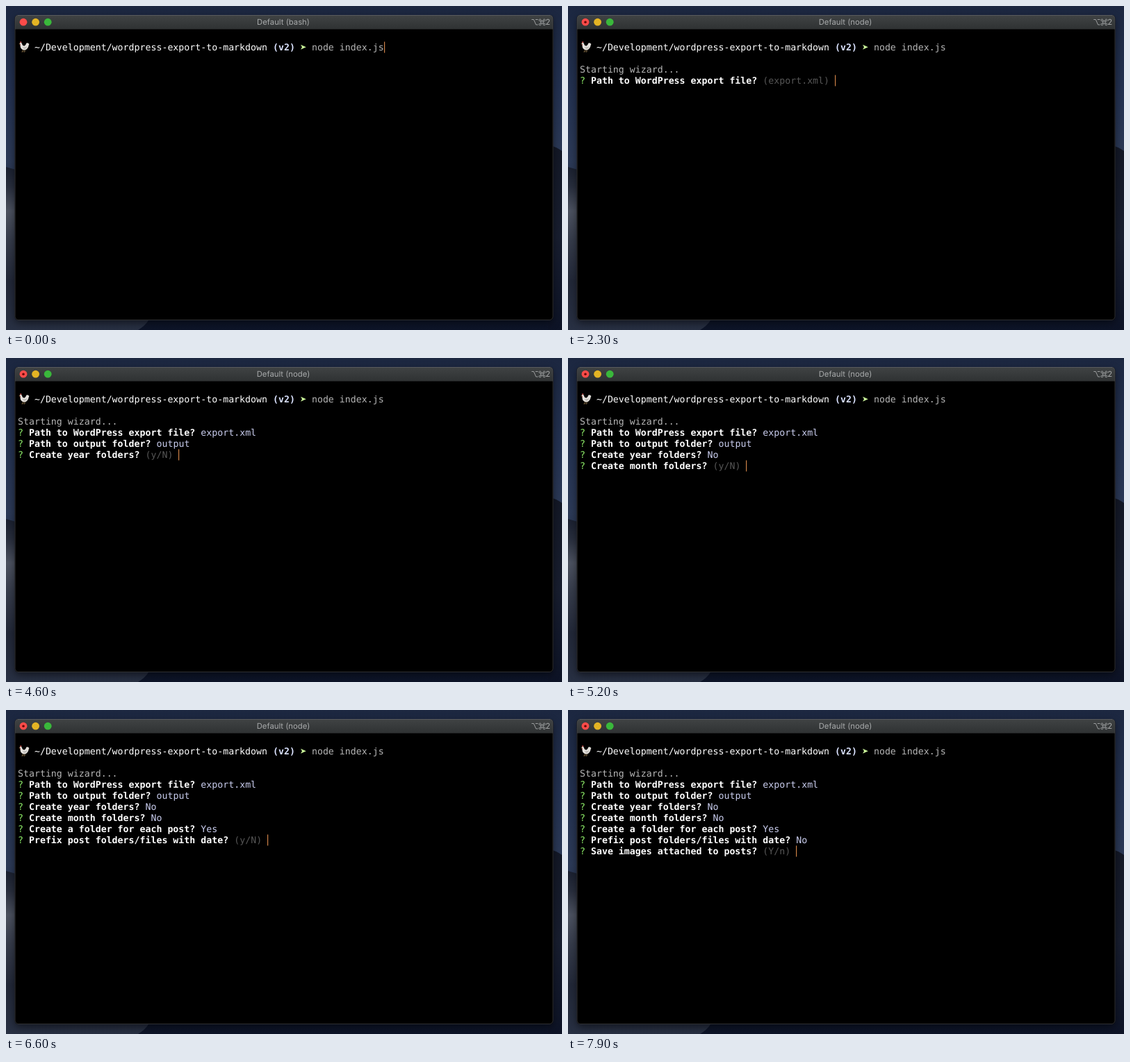
An HTML page that plays this animation: 800 by 467 pixels, repeating every 8 s.

```html
<!DOCTYPE html>
<html lang="en">
<head>
<meta charset="utf-8">
<title>Terminal wizard</title>
<style>
  html, body { margin: 0; width: 100%; height: 100%; overflow: hidden; background: #0b1022; }
  svg { display: block; width: 800px; height: 467px; }
  .mono { font: 13.255px "DejaVu Sans Mono", monospace; white-space: pre; fill: #b6b6b6; text-rendering: geometricPrecision; }
  .mono .path { fill: #fff; }
  .mono .branch { fill: #dbe3ff; font-weight: bold; }
  .mono .mark { fill: #8ff06a; }
  .mono .ask { fill: #fff; font-weight: bold; }
  .mono .hint { fill: #565656; }
  .mono .answer { fill: #c9cdee; }
  .title { font: 11.3px Inter, Roboto, sans-serif; fill: #a8aaab; text-rendering: geometricPrecision; }
</style>
</head>
<body>
<svg viewBox="0 0 800 467">
  <defs>
    <linearGradient id="sky" x2="0" y2="1">
      <stop offset="0" stop-color="#1c2740"/>
      <stop offset=".25" stop-color="#233150"/>
      <stop offset=".48" stop-color="#2c3a57"/>
      <stop offset=".7" stop-color="#172138"/>
      <stop offset="1" stop-color="#0d1428"/>
    </linearGradient>
    <linearGradient id="leftDune" x2="0" y2="1">
      <stop offset="0" stop-color="#1a2030"/>
      <stop offset=".12" stop-color="#282e3d"/>
      <stop offset=".27" stop-color="#4c5260"/>
      <stop offset=".45" stop-color="#363c4b"/>
      <stop offset=".7" stop-color="#222838"/>
      <stop offset="1" stop-color="#283043"/>
    </linearGradient>
    <linearGradient id="rightDune" x2="0" y2="1">
      <stop offset="0" stop-color="#131826"/>
      <stop offset=".5" stop-color="#181e2f"/>
      <stop offset="1" stop-color="#0d1326"/>
    </linearGradient>
    <linearGradient id="bar" x2="0" y2="1">
      <stop offset="0" stop-color="#404344"/>
      <stop offset="1" stop-color="#2f3233"/>
    </linearGradient>
    <filter id="blur" x="-10%" y="-10%" width="120%" height="120%">
      <feGaussianBlur stdDeviation="6"/>
    </filter>
  </defs>

  <rect width="800" height="467" fill="url(#sky)"/>
  <path d="M0 232L14 236L100 400L205 453Q200 461 190 467H0Z" fill="url(#leftDune)"/>
  <path d="M780 200Q792 203 800 209V467H780Z" fill="url(#rightDune)"/>
  <rect x="13" y="17" width="774" height="440" rx="6" fill="#000" opacity=".5" filter="url(#blur)"/>

  <rect x="12.5" y="13" width="775" height="440" rx="5" fill="#000"/>
  <path d="M13 33.5V18Q13 13 18 13H782Q787 13 787 18V33.5Z" fill="url(#bar)"/>
  <path d="M17 13.5H783" stroke="#66696b"/>
  <rect x="13" y="13.5" width="774" height="439" rx="5" fill="none" stroke="#505355" stroke-opacity=".6"/>
  <circle cx="25" cy="23.2" r="5.4" fill="#fc4b49"/>
  <circle id="busy" cx="25" cy="23.2" r="1.8" fill="#680a08"/>
  <circle cx="42.6" cy="23.2" r="5.4" fill="#e4b424"/>
  <circle cx="60.2" cy="23.2" r="5.4" fill="#3ab83b"/>
  <text id="title" class="title" x="399" y="27.3" text-anchor="middle"></text>
  <g fill="none" stroke="#a8aaab" stroke-width=".9">
    <path d="M756.3 19.5H759.3L762.6 27H765.5M761.8 19.5H765.5"/>
    <path d="M769.7 21.7H773.1V25.1H769.7Z"/>
    <circle cx="768.4" cy="20.4" r="1.4"/>
    <circle cx="774.4" cy="20.4" r="1.4"/>
    <circle cx="768.4" cy="26.4" r="1.4"/>
    <circle cx="774.4" cy="26.4" r="1.4"/>
  </g>
  <text class="title" x="776.3" y="27.3">2</text>

  <!-- rooster -->
  <path d="M24.5 63L24.2 66H22.5M27 63V66H25.5" fill="none" stroke="#a98a58" stroke-width=".8"/>
  <path d="M20 53.2Q22 51.8 23 54.2Q23.8 57.6 26.5 57.4Q28.6 56.4 29.4 53.6Q31.8 52.4 33.4 55Q32.6 56 32.4 58Q31 62.4 27.4 63.4Q22.8 63.8 21 60Q20.4 57 20 53.2Z" fill="#e4e1dc"/>
  <path d="M24 59.3Q27 60.2 30.6 58Q29.4 61.6 26.5 61.8Q24.5 61.2 24 59.3Z" fill="#bab7b3"/>
  <path d="M19.8 53L20 51.4L21 51.6L21.8 51L22.8 52.8ZM19.8 55.3L21 55L20.8 57.2Q19.7 57 19.8 55.3Z" fill="#b8504a"/>
  <path d="M20.1 53.8L18.4 54.7L20.1 55.1Z" fill="#c2a06a"/>

  <g class="mono" id="screen">
    <path d="M424 55.8L431.8 59.3L424 62.8L426 59.3Z" fill="#cbf59a"/>
  </g>
  <rect id="cursor" width="1.2" height="16" fill="#cc8046"/>
</svg>

<script>
  const LOOP = 8000, ENTER = 1000, READY = 1800;
  const LEFT = 17, CELL = 7.98, BASE = 64, LINE = 16;

  // question, hint, answer, time of the answer
  const steps = [
    ["Path to WordPress export file?", "(export.xml)", "export.xml", 3300],
    ["Path to output folder?", "(output)", "output", 4100],
    ["Create year folders?", "(y/N)", "No", 4900],
    ["Create month folders?", "(y/N)", "No", 5700],
    ["Create a folder for each post?", "(Y/n)", "Yes", 6500],
    ["Prefix post folders/files with date?", "(y/N)", "No", 7300],
    ["Save images attached to posts?", "(Y/n)", "Yes", LOOP]
  ];

  const byId = id => document.getElementById(id);
  const show = (node, on) => node.setAttribute("visibility", on ? "visible" : "hidden");
  const column = n => LEFT + n * CELL;

  function addText(kind, col, line, text) {
    const node = document.createElementNS("http://www.w3.org/2000/svg", "text");
    node.setAttribute("class", kind);
    node.setAttribute("x", column(col));
    node.setAttribute("y", BASE + line * LINE);
    node.textContent = text;
    byId("screen").append(node);
    return node;
  }

  addText("path", 3, 0, "~/Development/wordpress-export-to-markdown");
  addText("branch", 46, 0, "(v2)");
  addText("command", 53, 0, "node index.js");
  const start = addText("log", 0, 2, "Starting wizard...");

  const rows = steps.map(([ask, hint, answer, end], i) => {
    const line = 3 + i, replyCol = ask.length + 3;
    return {
      line,
      begin: i ? steps[i - 1][3] : READY,
      end,
      cursorCol: replyCol + hint.length + 1,
      label: [addText("mark", 0, line, "?"), addText("ask", 2, line, ask)],
      hint: addText("hint", replyCol, line, hint),
      answer: addText("answer", replyCol, line, answer)
    };
  });

  function placeCursor(col, line) {
    byId("cursor").setAttribute("x", Math.round(column(col)));
    byId("cursor").setAttribute("y", 51.5 + line * LINE);
  }

  function render(t) {
    const ready = t >= READY;
    byId("title").textContent = `Default (${ready ? "node" : "bash"})`;
    show(byId("busy"), ready);
    show(start, ready);
    if (t < ENTER) placeCursor(66, 0);
    else if (!ready) placeCursor(0, 1);
    for (const row of rows) {
      const asking = t >= row.begin && t < row.end;
      row.label.forEach(node => show(node, t >= row.begin));
      show(row.hint, asking);
      show(row.answer, t >= row.end);
      if (asking) placeCursor(row.cursorCol, row.line);
    }
  }

  const origin = performance.now();
  function tick() {
    render((performance.now() - origin) % LOOP);
    requestAnimationFrame(tick);
  }
  tick();
</script>
</body>
</html>
```
